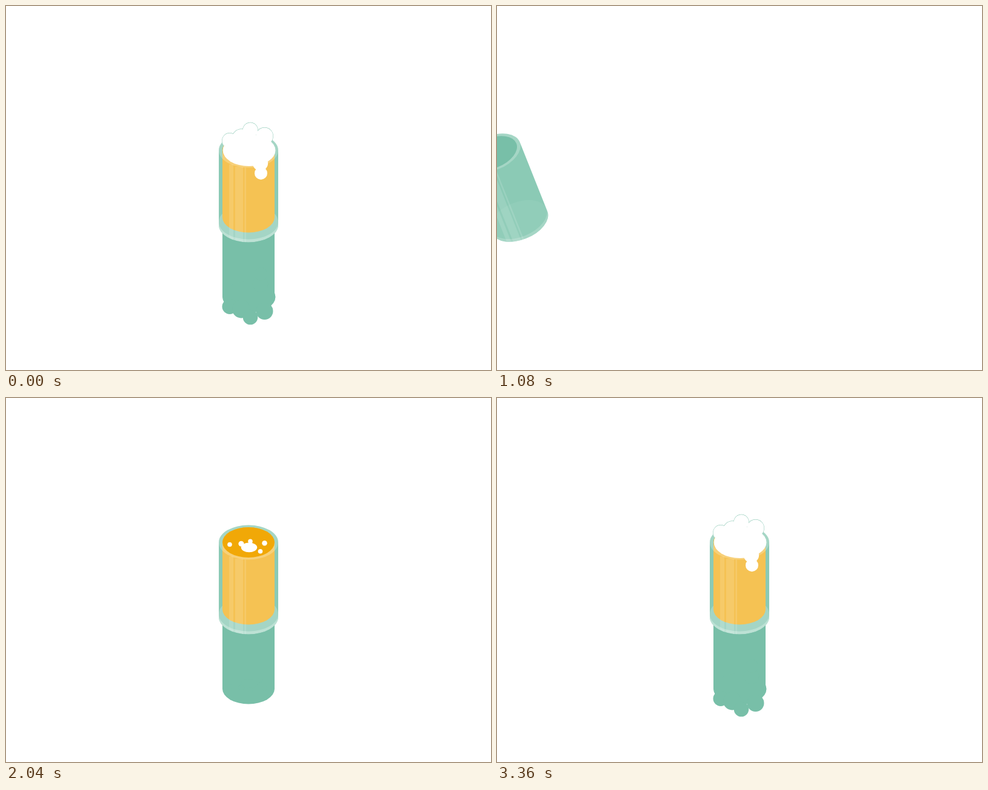
An HTML page with a canvas for the animation above (3.52 s loop, 800 px wide and 600 px high).

```html
<!DOCTYPE html>
<html lang="en">
<head>
<meta charset="utf-8">
<title>Beer glass</title>
<style>
  html, body { margin: 0; width: 100%; height: 100%; overflow: hidden; background: #fff; }
  canvas { display: block; width: 800px; height: 600px; }
</style>
</head>
<body>
<canvas id="stage" width="800" height="600"></canvas>
<script>
const ctx = document.getElementById('stage').getContext('2d');
const LOOP = 3520, STEP = 40, PI = Math.PI;
const CX = 400, CY = 299.5, RIM = 238, BASE = 361, MIRROR = 358.75;
const OUTER = [49, 28.5], INNER = [43, 25];
const TEAL = '#78bfa8', BODY = '#8bcab5', BEER = '#f1a807', BEER_FRONT = '#f5c253';

// Foam bubbles: x, y, radius
const BUBBLES = [[369, 222, 12.5], [388, 218, 15], [403, 204.5, 12.3], [426.5, 214.5, 14], [419.5, 259, 12.6]];

const clamp = v => Math.max(0, Math.min(1, v));
const span = (t, a, b) => clamp((t - a) / (b - a));
const mix = (a, b, u) => a + (b - a) * u;
const easeOut = u => 1 - (1 - u) ** 3;
const backOut = u => 1 + 2.70158 * (u - 1) ** 3 + 1.70158 * (u - 1) ** 2;
const white = a => `rgba(255,255,255,${a})`;

function fill(path, color) {
  ctx.beginPath();
  path();
  ctx.fillStyle = color;
  ctx.fill();
}

function inside(path, paint) {
  ctx.save();
  ctx.beginPath();
  path();
  ctx.clip();
  paint();
  ctx.restore();
}

function disc(x, y, rx, ry, color) {
  fill(() => ctx.ellipse(x, y, rx, ry, 0, 0, 2 * PI), color);
}

function cylinder([rx, ry], top, bottom) {
  ctx.ellipse(CX, top, rx, ry, 0, PI, 2 * PI);
  ctx.ellipse(CX, bottom, rx, ry, 0, 0, PI);
  ctx.closePath();
}

const hull = () => cylinder(OUTER, RIM, BASE);
const tank = () => cylinder(INNER, RIM, 348.5);

function opening() {
  ctx.rect(300, -100, 200, RIM + 100);
  ctx.moveTo(443, RIM);
  ctx.ellipse(CX, RIM, ...INNER, 0, 0, 2 * PI);
}

function halfRim(from) {
  fill(() => {
    ctx.ellipse(CX, RIM, ...OUTER, 0, from, from + PI);
    ctx.ellipse(CX, RIM, ...INNER, 0, from + PI, from, true);
  }, white(0.22));
}

// The stream falls in on the right while the level climbs on the left.
function beer(t, color) {
  if (t < 1480) return;
  const now = Math.min(t, 2000);
  const level = 305 - (now - 1720) * 0.375;
  const fall = mix(53, 207, (now - 1480) / 240);
  const head = Math.min(fall, level - 60);
  const front = Math.min(376, 90 + (now - 1480) * 3.5);

  const paint = () => fill(() => {
    ctx.moveTo(357, level - 27);
    ctx.lineTo(382, level);
    ctx.bezierCurveTo(400, level + 3, 417, level - 5, 417, level - 30);
    ctx.bezierCurveTo(417, level - 65, 395, head + 15, 395, head);
    ctx.bezierCurveTo(401, head - 15, 430, head - 13, 437, head - 3);
    ctx.bezierCurveTo(441, head + 8, 443, head + 28, 443, head + 43);
    ctx.lineTo(443, 376);
    ctx.lineTo(357, 376);
  }, color);

  inside(() => ctx.rect(350, 0, 100, front), () => {
    inside(tank, paint);
    const top = fall - 14;
    if (top < RIM) inside(() => ctx.rect(393, top, 52, RIM - top), paint);
  });
}

function foam(t, color, grow = 0) {
  const k = backOut(span(t, 2000, 2560));
  if (k <= 0) return;
  const lift = Math.min(1, k);
  const blob = (x, y, rx, ry) => disc(x, mix(250, y, lift), rx * k + grow, ry * k + grow, color);
  blob(401, 238, 43.5, 26);
  for (const [x, y, r] of BUBBLES) blob(x, y, r, r);

  const u = easeOut(span(t, 2600, 3120));
  const r = mix(8, 10.5, u) + grow;
  if (u > 0) disc(mix(419.5, 420.5, u), mix(259, 275.7, u), r, r, color);
}

// Small flecks rise off the foam and shrink away.
function flecks(t, mirrored) {
  [403, 382, 428, 394.5].forEach((x, i) => {
    const u = (t - 2050 - i * 180) / 700;
    if (u < 0.15 || u >= 1) return;
    const y = 205 - 80 * u, r = 0.7 + 2.6 * (1 - u);
    if (mirrored) return disc(x, y, r * 0.6, r * 0.6, TEAL);
    disc(x, y, r + 0.3, r + 0.3, TEAL);
    disc(x, y, r, r, '#fff');
  });
}

function glass(t) {
  const wet = span(t, 1520, 1680);
  fill(hull, BODY);
  inside(hull, () => {
    disc(CX, 356, ...OUTER, white(mix(0.05, 0.21, wet)));
    fill(() => {
      ctx.ellipse(CX, BASE, ...OUTER, 0, 0, PI);
      ctx.ellipse(CX, 356, ...OUTER, 0, PI, 0, true);
    }, white(mix(0.22, 0.42, wet)));
  });

  disc(CX, RIM, ...INNER, TEAL);
  halfRim(PI);
  beer(t, BEER_FRONT);
  inside(opening, () => beer(t, BEER));
  halfRim(0);

  inside(hull, () => {
    ctx.fillStyle = white(0.13);
    for (const [x, w] of [[368, 7], [378, 13], [393.5, 2.5]]) {
      const dx = (x + w / 2 - CX) / OUTER[0];
      const top = RIM + OUTER[1] * Math.sqrt(1 - dx * dx);
      ctx.fillRect(x, top, w, 400 - top);
    }
  });
}

// Sideways offset and tilt of the glass.
function slide(t) {
  if (t >= 360 && t < 760) {
    const n = (t - 320) / 200;
    return [80.7 * n ** 2.4, 0.053 * n ** 1.5];
  }
  if (t >= 920 && t < 1440) {
    const n = (1440 - t) / 160;
    return [-22 * n ** 3.53, 0.05 * n ** 2.5];
  }
  return [0, 0];
}

function place([dx, tilt], flip) {
  ctx.setTransform(1, 0, 0, flip ? -1 : 1, dx, flip ? 2 * MIRROR : 0);
  ctx.translate(CX, CY);
  ctx.rotate(-tilt);
  ctx.translate(-CX, -CY);
}

function draw(t) {
  ctx.setTransform(1, 0, 0, 1, 0, 0);
  ctx.fillStyle = '#fff';
  ctx.fillRect(0, 0, 800, 600);
  if (t >= 760 && t < 920) return;

  const pose = slide(t);
  if (t < 760) t = LOOP; // the full glass leaves as it stood at the end of the loop

  place(pose, true);
  beer(t, TEAL);
  foam(t, TEAL);
  flecks(t, true);

  place(pose, false);
  foam(t, TEAL, 0.4);
  flecks(t, false);
  glass(t);
  foam(t, '#fff');
}

const began = performance.now();
function frame() {
  const t = (performance.now() - began) % LOOP;
  draw(Math.floor(t / STEP) * STEP);
  requestAnimationFrame(frame);
}
frame();
</script>
</body>
</html>
```
